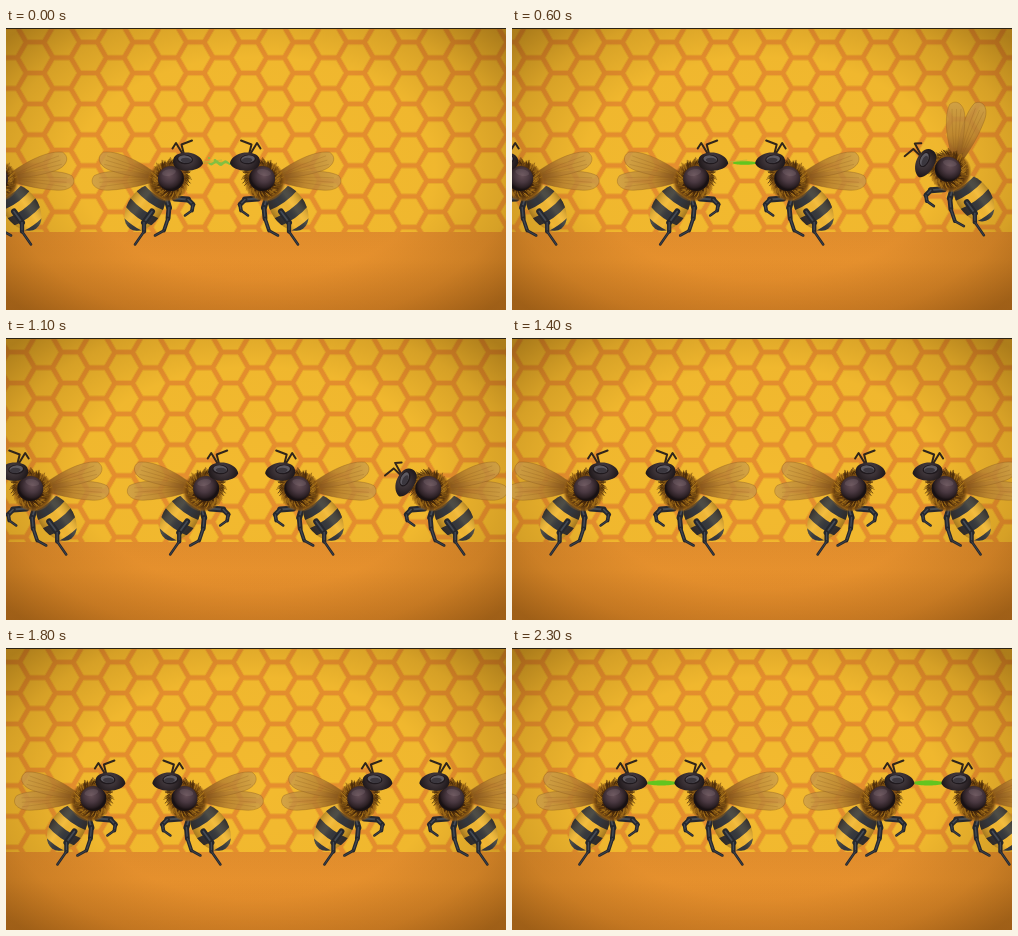
An HTML page with a canvas for the animation above (2400 ms loop, 500 by 282 pixels).

```html
<!DOCTYPE html>
<html lang="en">
<head>
<meta charset="utf-8">
<title>Bees on a honeycomb</title>
<style>
html, body { margin: 0; width: 100%; height: 100%; overflow: hidden; background: #d98a24; }
canvas { display: block; width: 500px; height: 282px; }
</style>
</head>
<body>
<canvas id="stage" width="500" height="282"></canvas>
<script>
const g = document.getElementById('stage').getContext('2d');
const W = 500, H = 282, LOOP = 2400, STEP = 100, CUT = 1300;
const FLOOR = 204, HEAD_Y = 133.5, SPEED = 0.032, PAIR = 267, GAP = 57;
const TAU = Math.PI * 2, CELL = PAIR / 5;

function seeded(seed) {
  return () => {
    seed = (seed * 16807) % 2147483647;
    return seed / 2147483647;
  };
}

const clamp = v => Math.max(0, Math.min(1, v));

function radial(x, y, r, stops) {
  const grad = g.createRadialGradient(x, y, 0, x, y, r);
  stops.forEach(([at, color]) => grad.addColorStop(at, color));
  return grad;
}

function oval(x, y, rx, ry, turn, fill) {
  g.beginPath();
  g.ellipse(x, y, rx, ry, turn, 0, TAU);
  g.fillStyle = fill;
  g.fill();
}

function line(points, width, color) {
  g.beginPath();
  points.forEach(([x, y], i) => i ? g.lineTo(x, y) : g.moveTo(x, y));
  g.lineWidth = width;
  g.strokeStyle = color;
  g.stroke();
}

function hexagon(x, y, r) {
  g.beginPath();
  for (let i = 0; i < 6; i++) {
    g.lineTo(x + r * Math.cos(i * TAU / 6), y + r * Math.sin(i * TAU / 6));
  }
  g.closePath();
}

function vignette() {
  g.save();
  g.translate(250, 140);
  g.scale(1, 0.62);
  g.fillStyle = radial(0, 0, 325, [
    [0, 'rgba(90,50,0,0)'], [0.55, 'rgba(90,50,0,0.02)'],
    [0.8, 'rgba(90,50,0,0.19)'], [1, 'rgba(80,44,0,0.43)']
  ]);
  g.fillRect(-250, -230, W, 470);
  g.restore();
}

function backdrop(shift) {
  g.fillStyle = '#e68f2e';
  g.fillRect(0, 0, W, FLOOR);
  g.lineJoin = 'round';
  const rowH = CELL / Math.sqrt(3);
  const start = ((shift % CELL) + CELL) % CELL - CELL * 1.5;
  for (let col = 0; col < 24; col++) {
    const x = start + col * CELL / 2;
    const top = col % 2 ? 14.2 : -1.2;
    for (let y = top; y < FLOOR + 16; y += rowH) {
      hexagon(x, y, 14.8);
      g.fillStyle = '#f3ba2f';
      g.fill();
      g.lineWidth = 1;
      g.strokeStyle = '#ecab2d';
      g.stroke();
    }
  }
  const floor = g.createLinearGradient(0, FLOOR, 0, H);
  floor.addColorStop(0, '#e28e2d');
  floor.addColorStop(0.35, '#e8922e');
  floor.addColorStop(1, '#da8528');
  g.fillStyle = floor;
  g.fillRect(0, FLOOR, W, H - FLOOR);
  vignette();
}

function wing(length, width, angle) {
  g.save();
  g.translate(-25, 17);
  g.rotate(angle);
  g.beginPath();
  g.moveTo(0, 0);
  g.bezierCurveTo(-length * 0.3, -width * 0.55, -length * 0.72, -width, -length * 0.95, -width * 0.5);
  g.bezierCurveTo(-length * 1.04, 0, -length * 0.95, width * 0.6, -length * 0.76, width * 0.6);
  g.bezierCurveTo(-length * 0.5, width * 0.62, -length * 0.2, width * 0.35, 0, 0);
  const tint = g.createLinearGradient(-length, 0, 0, 0);
  tint.addColorStop(0, 'rgba(202,158,78,0.75)');
  tint.addColorStop(0.5, 'rgba(180,126,48,0.82)');
  tint.addColorStop(1, 'rgba(104,58,14,0.95)');
  g.fillStyle = tint;
  g.fill();
  g.lineWidth = 0.7;
  g.strokeStyle = 'rgba(140,92,30,0.5)';
  g.stroke();
  for (let i = -1; i <= 1; i++) {
    g.beginPath();
    g.moveTo(-6, 0);
    g.quadraticCurveTo(-length * 0.5, i * width * 0.25 - 1, -length * 0.88, i * width * 0.32);
    g.strokeStyle = 'rgba(120,74,22,0.25)';
    g.stroke();
  }
  g.restore();
}

// Segments grow thinner towards the foot.
function leg(points) {
  for (let i = 1; i < points.length; i++) {
    const w = 6 - 3.4 * (i - 1) / (points.length - 2);
    line([points[i - 1], points[i]], w, '#26282e');
    line([points[i - 1], points[i]], w * 0.3, '#444a54');
  }
}

function abdomen() {
  g.save();
  g.translate(-43, 46);
  g.rotate(-0.95);
  g.beginPath();
  g.ellipse(0, 0, 26, 17, 0, 0, TAU);
  g.fillStyle = '#f2b733';
  g.fill();
  g.clip();
  for (const [x, w] of [[-27, 8], [-10, 9.5], [9, 10]]) {
    g.beginPath();
    g.moveTo(x, -19);
    g.quadraticCurveTo(x - 5, 0, x, 19);
    g.lineTo(x + w, 19);
    g.quadraticCurveTo(x + w - 5, 0, x + w, -19);
    g.fillStyle = '#34373d';
    g.fill();
  }
  const shade = g.createLinearGradient(0, -17, 0, 17);
  shade.addColorStop(0, 'rgba(40,20,0,0.3)');
  shade.addColorStop(0.35, 'rgba(255,230,140,0.12)');
  shade.addColorStop(0.65, 'rgba(40,20,0,0)');
  shade.addColorStop(1, 'rgba(40,20,0,0.4)');
  g.fillStyle = shade;
  g.fillRect(-28, -19, 56, 38);
  g.restore();
}

function thorax() {
  const rnd = seeded(77);
  const cx = -17, cy = 17;
  oval(cx - 3, cy + 3, 21, 20, 0, radial(cx - 3, cy + 3, 21, [
    [0, '#281508'], [0.66, '#4a2a0a'], [0.85, 'rgba(128,78,16,0.85)'], [1, 'rgba(170,110,24,0)']
  ]));
  for (let i = 0; i < 200; i++) {
    const a = rnd() * TAU, r = 13 + rnd() * 4, out = r + 2 + rnd() * 2.5;
    const gold = Math.sin(a) > 0.4 || Math.cos(a) < -0.7;
    line([[cx + r * Math.cos(a), cy + r * Math.sin(a)],
      [cx + out * Math.cos(a + 0.12), cy + out * Math.sin(a + 0.12)]],
      0.8, gold ? (i % 3 ? 'rgba(176,122,28,0.8)' : 'rgba(106,65,15,0.8)') : 'rgba(75,44,12,0.7)');
  }
  oval(cx, cy, 13, 12.4, 0, radial(cx - 2, cy - 3, 14, [[0, '#665057'], [0.5, '#493840'], [0.85, '#2c2024'], [1, '#181113']]));
  oval(cx - 2, cy - 6, 7, 3.2, -0.2, 'rgba(150,130,138,0.22)');
}

function head(drop) {
  g.save();
  g.translate(6 * drop, 11 * drop);
  g.rotate(1.05 * drop);
  line([[-5, -7], [-12, -18.5], [-15.5, -13]], 2, '#30251c');
  line([[-4, -7], [-6.5, -17], [4, -21]], 2, '#30251c');
  g.beginPath();
  g.moveTo(-15, 0);
  g.bezierCurveTo(-15, -8, -5, -10, 3, -8.5);
  g.bezierCurveTo(10, -7, 15, -2, 15, 2);
  g.bezierCurveTo(13, 7, 4, 10, -4, 9);
  g.bezierCurveTo(-11, 8.5, -15, 5, -15, 0);
  g.fillStyle = radial(0, -2, 16, [[0, '#4d4448'], [0.5, '#362d31'], [1, '#1b1517']]);
  g.fill();
  oval(-3, -2, 8, 4.8, 0.08, '#201a1e');
  oval(-3, -2.4, 6.8, 3.7, 0.08, '#5d5a62');
  oval(-2, -1.2, 5.4, 2.6, 0.08, '#3b373e');
  g.restore();
}

// Drawn facing right around the head; dir -1 mirrors it.
function bee(x, y, dir, lift = 0, drop = 0) {
  g.save();
  g.translate(x, y);
  g.scale(dir, 1);
  g.lineCap = g.lineJoin = 'round';
  wing(72, 14, -0.06 + lift);
  wing(68, 14, 0.31 + lift);
  leg([[-22, 36], [-19, 46], [-20, 57], [-24, 69], [-33, 74]]);
  abdomen();
  leg([[-36, 50], [-44, 61], [-44, 70], [-53, 83]]);
  leg([[-13, 37], [0, 38], [5, 43], [4, 49], [-3, 54]]);
  thorax();
  head(drop);
  g.restore();
}

// Green drop passed along the tongues between two heads.
function nectar(x, amount, ragged) {
  if (amount <= 0) return;
  const a = x + 15, b = x + GAP - 14, y = HEAD_Y + 1.5;
  line([[a, y + 0.5], [b - 8, y - 1]], 0.9, '#c9a52b');
  line([[a, y - 1], [b - 9, y - 3]], 0.8, '#b9b83a');
  g.beginPath();
  const from = a + (1 - amount) * 10, n = 16;
  const edge = (i, side) => {
    const u = i / n;
    const half = (1 + 1.5 * amount) * Math.pow(Math.sin(Math.PI * (0.08 + u * 0.84)), 0.5);
    return [from + (b - from) * u, y + side * half + ragged * Math.sin(i * 0.9) * 1.3];
  };
  for (let i = 0; i <= n; i++) g.lineTo(...edge(i, -1));
  for (let i = n; i >= 0; i--) g.lineTo(...edge(i, 1));
  g.closePath();
  g.fillStyle = ragged ? '#83c042' : '#62c51f';
  g.fill();
  if (ragged) {
    oval(a + 6, y - 5 * ragged, 1.2, 1, 0, '#83bd3e');
    oval(a + 12, y - 3 * ragged, 1.4, 1, 0, '#83bd3e');
  }
}

function pairs(x, amount, ragged) {
  for (const right of [x - PAIR, x, x + PAIR]) {
    nectar(right, amount, ragged);
    bee(right, HEAD_Y, 1);
    bee(right + GAP, HEAD_Y, -1);
  }
}

function arrival(t, x) {
  const away = Math.max(0, (700 - t) / 300);
  const lift = t < 700
    ? 1.05 + 0.2 * Math.cos(t / 100 * Math.PI)
    : 0.84 * clamp((1100 - t) / 300);
  bee(x + GAP + 131 + 89 * away, HEAD_Y - 28 * away, -1, lift, 1);
}

function draw(t) {
  const first = t < CUT;
  const x = first ? 182 + SPEED * t : 98 + SPEED * (t - 1600);
  backdrop(x + 34);
  if (first) {
    const amount = t < 300 ? 0.45 + 0.55 * t / 300 : clamp((700 - t) / 200);
    // The right-hand slot stays free for the landing bee.
    nectar(x, amount, t < 300 ? 1 - t / 300 : 0);
    bee(x + GAP - PAIR, HEAD_Y, -1);
    bee(x, HEAD_Y, 1);
    bee(x + GAP, HEAD_Y, -1);
    arrival(t, x);
  } else {
    const amount = clamp((t - 1800) / 400);
    pairs(x, amount, 1 - amount);
  }
  g.fillStyle = '#2a2213';
  g.fillRect(0, 0, W, 1);
}

const begin = performance.now();
function tick(now) {
  const t = Math.max(0, now - begin) % LOOP;
  draw(Math.floor(t / STEP) * STEP);
  requestAnimationFrame(tick);
}
draw(0);
requestAnimationFrame(tick);
</script>
</body>
</html>
```
